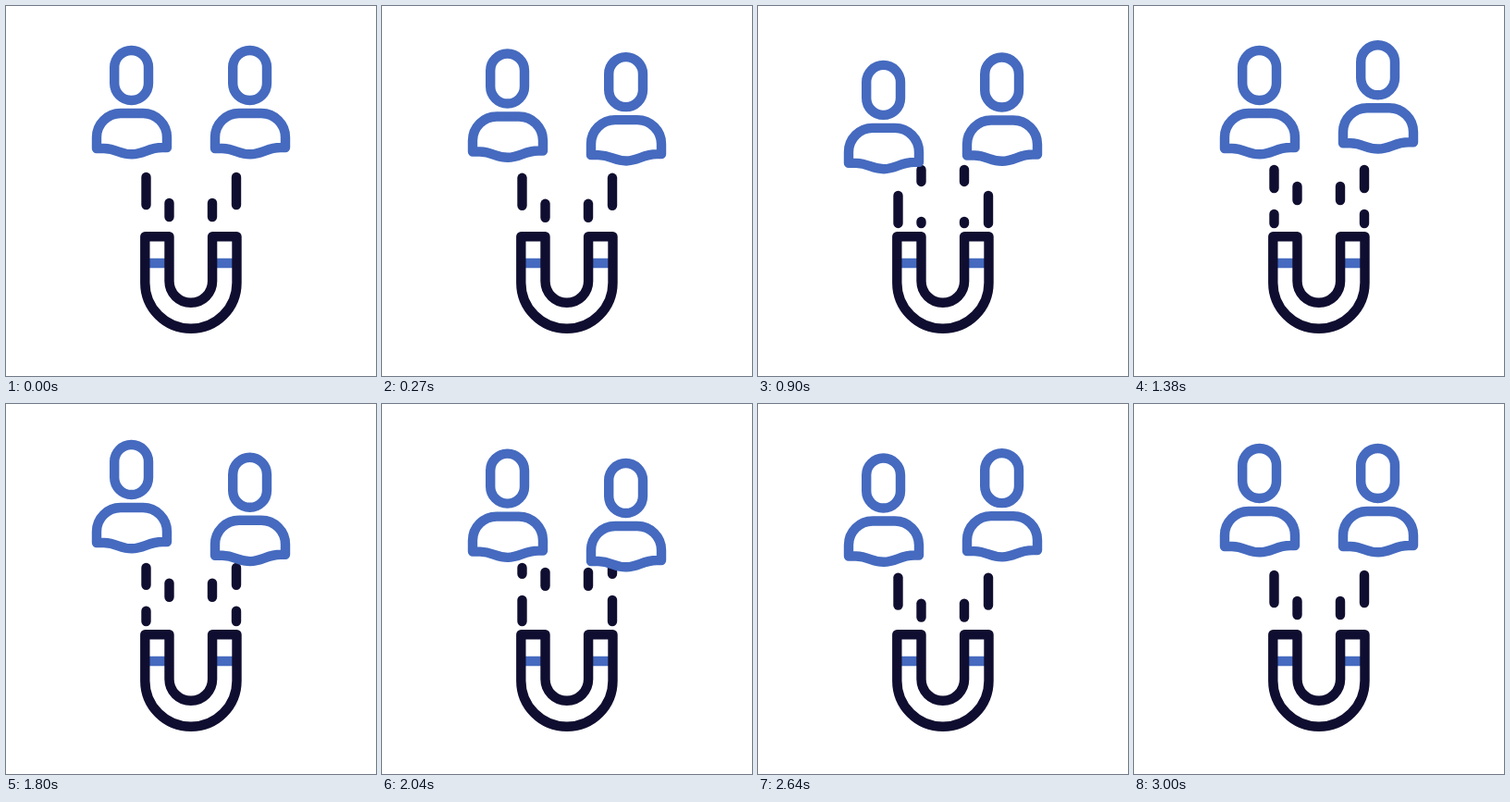
Recreate the animation shown at these times as an HTML page. Size 400x400 px, loop 3.09 s.

```html
<!DOCTYPE html>
<html>
<head>
<meta charset="utf-8">
<style>
  html, body { margin: 0; height: 100%; overflow: hidden; background: #fff; }
  svg { display: block; width: 100vw; height: 100vh; }
</style>
</head>
<body>
<svg viewBox="0 0 400 400" fill="none" stroke-width="10.4" stroke-linecap="round" stroke-linejoin="round">
  <defs>
    <g id="person">
      <rect x="117.2" y="48" width="36.8" height="54" rx="18.4"/>
      <path d="M98 142A26 26 0 0 1 124 116H148A26 26 0 0 1 174 142V153H169C154 153 149 160.3 136 160.3C123 160.3 120 154.5 106 154H98Z"/>
    </g>
  </defs>
  <path d="M151 278H176M223.500 278H249" stroke="#456abf" stroke-linecap="butt"/>
  <g stroke="#100e30">
    <path d="M150.300 249.300H176.500V297.500A23.300 23.300 0 0 0 223.100 297.500V249.300H249.500V299.200A49.600 49.600 0 0 1 150.300 299.200Z"/>
    <path class="outer" d="M151.500 177V235"/>
    <path class="outer" d="M249 177V235"/>
    <path class="inner" d="M176.500 177V235"/>
    <path class="inner" d="M223 177V235"/>
  </g>
  <g stroke="#456abf">
    <use id="left" href="#person"/>
    <use id="right" href="#person"/>
  </g>
</svg>
<script>
const LOOP = 3090, END = 3000, TRACK = 58, TRAVEL = 98;
const heights = [0, 16, -6, 16, 0];
const people = [
  { el: document.getElementById('left'), x: 0, times: [0, 870, 1655, 2400, END] },
  { el: document.getElementById('right'), x: 128, times: [0, 580, 1330, 2060, END] }
];
const dashes = [
  { els: document.querySelectorAll('.outer'), start: 8, len: 30 },
  { els: document.querySelectorAll('.inner'), start: 36, len: 15 }
];

const sine = p => (1 - Math.cos(Math.PI * p)) / 2;
const quart = p => p < .5 ? 8 * p ** 4 : 1 - 8 * (1 - p) ** 4;

for (const { els, len } of dashes)
  for (const el of els) el.setAttribute('stroke-dasharray', `${len} ${TRACK - len}`);

function bob(t, times) {
  let i = 0;
  while (i < times.length - 2 && t > times[i + 1]) i++;
  const p = (t - times[i]) / (times[i + 1] - times[i]);
  return heights[i] + (heights[i + 1] - heights[i]) * sine(p);
}

function draw(now) {
  const t = Math.min(now % LOOP, END);
  for (const { el, x, times } of people)
    el.setAttribute('transform', `translate(${x} ${bob(t, times)})`);

  // Dashes run down their tracks with wrap-around, then back up.
  const shift = TRAVEL * quart(1 - Math.abs(2 * t / END - 1));
  for (const { els, start } of dashes)
    for (const el of els) el.setAttribute('stroke-dashoffset', -(start + shift));
}

let begin;
function frame(now) {
  begin ??= now;
  draw(now - begin);
  requestAnimationFrame(frame);
}
draw(0);
requestAnimationFrame(frame);
</script>
</body>
</html>
```
